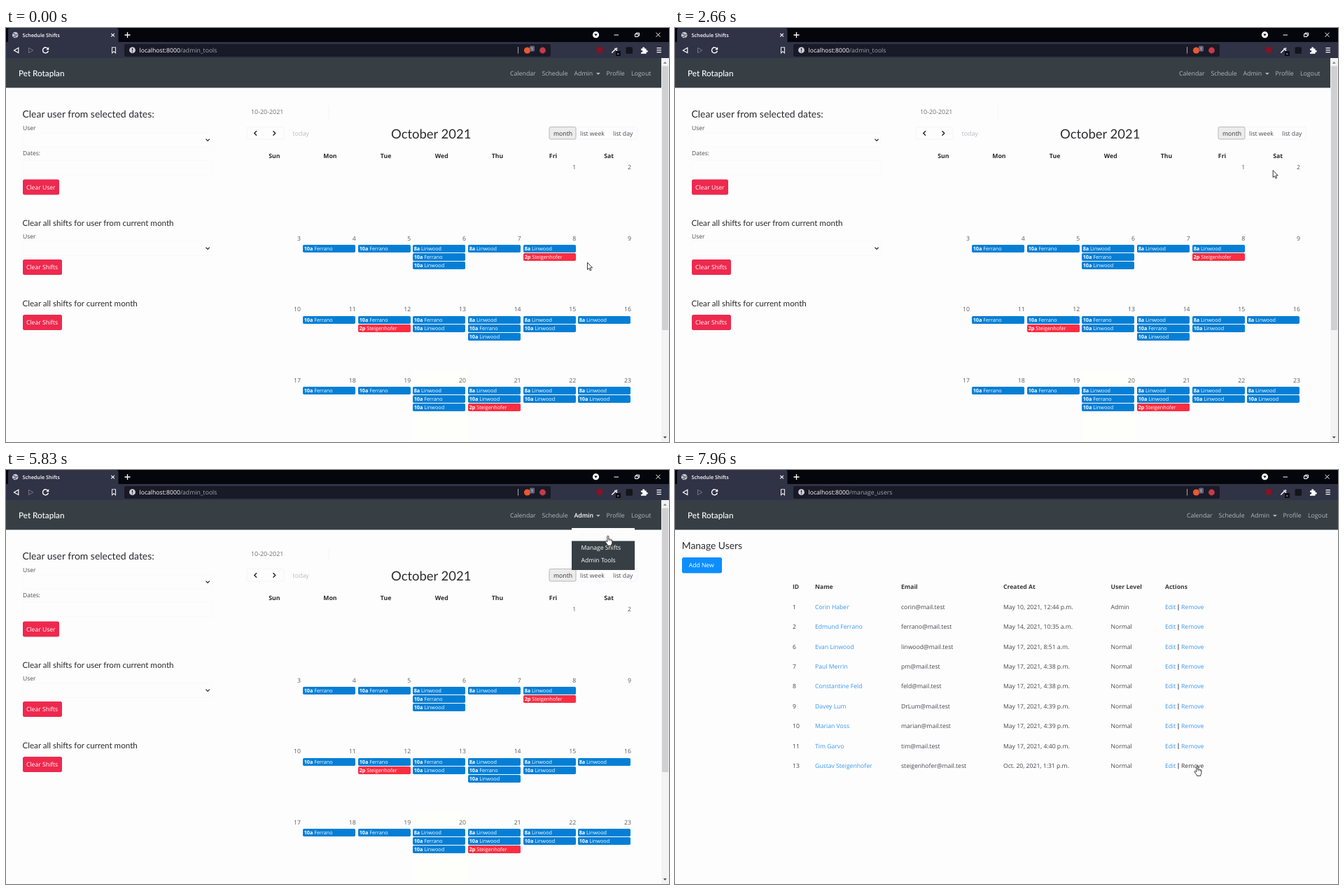
An HTML page for the animation above (8000 ms loop, 947x592 px).

```html
<!DOCTYPE html>
<html lang="en">
<head>
<meta charset="utf-8">
<title>Schedule Shifts</title>
<style>
html, body { margin: 0; width: 100%; height: 100%; overflow: hidden; background: #fdfdfe; }
svg { display: block; width: 947px; height: 592px; }
text { font-family: "Open Sans", "Noto Sans", sans-serif; white-space: pre; text-rendering: geometricPrecision; }
text.lato { font-family: Lato, sans-serif; }
</style>
</head>
<body>
<svg id="stage" viewBox="0 0 947 592"></svg>
<script>
const LOOP = 8000;
const stage = document.getElementById('stage');

function el(parent, tag, attrs = {}) {
  const node = document.createElementNS('http://www.w3.org/2000/svg', tag);
  for (const key in attrs) node.setAttribute(key, attrs[key]);
  parent.appendChild(node);
  return node;
}
const group = (parent) => el(parent, 'g');
const rect = (p, x, y, width, height, fill, rx = 0, more = {}) =>
  el(p, 'rect', { x, y, width, height, fill, rx, ...more });
const circle = (p, cx, cy, r, fill, more = {}) => el(p, 'circle', { cx, cy, r, fill, ...more });
const line = (p, d, stroke, width = 1, more = {}) =>
  el(p, 'path', { d, stroke, 'stroke-width': width, fill: 'none', ...more });
const shape = (p, d, fill, more = {}) => el(p, 'path', { d, fill, ...more });

// y is the middle of the capitals
function text(p, x, y, str, size = 8.7, fill = '#3a3a3c', more = {}) {
  const node = el(p, 'text', { x, y: y + size * 0.357, 'font-size': size, fill, ...more });
  node.textContent = str;
  return node;
}
const bold = { 'font-weight': 700 };
const semi = { 'font-weight': 600 };
const medium = { 'font-weight': 500 };
const lato = { class: 'lato' };
const show = (node, on) => node.setAttribute('visibility', on ? 'visible' : 'hidden');

// Browser frame
const chrome = group(stage);
rect(chrome, 0, 0, 947, 43, '#05060c');
rect(chrome, 0, 20, 947, 23.5, '#303245');
shape(chrome, 'M3 20V3Q3 0 6 0H157Q160.500 0 160.500 3V20Z', '#303245');
rect(chrome, 169, 23, 609, 18, '#191a27', 2);

const globe = group(chrome);
circle(globe, 13.2, 10, 4.3, '#c9cad0');
line(globe, 'M9.500 8.500Q12 7.500 13 9.500T16.500 9M10.500 12.500Q13 11 14.500 13.500', '#505266', 1.2);
const spinner = line(chrome, 'M13.500 5.700A4.300 4.300 0 0 1 13.500 14.300', '#d4552f', 1.3);

const tabTitle = text(chrome, 23.5, 10, '', 7.25, '#fff', semi);
line(chrome, 'M150.300 7.800l4.600 4.600m0-4.600l-4.600 4.600', '#fff', 1.1);
line(chrome, 'M169.500 10h8m-4-4v8', '#fff', 1.3);
circle(chrome, 842.5, 9.7, 4.6, '#fff');
shape(chrome, 'M840.200 8.500h4.600l-2.300 3Z', '#05060c');
line(chrome, 'M868.500 10h6.500M898.500 8.500h4.500v4h-4.500ZM900 8.500v-1.500h4.500v4h-1.500M928.500 6.700l6 6m0-6l-6 6', '#fff', 1);

line(chrome, 'M17.800 28.300v7.200L11.500 31.900Z', '#fff', 1.2);
line(chrome, 'M32.500 28.300v7.200l6.300-3.600Z', '#737587', 1);
const reload = group(chrome);
line(reload, 'M60 29.800A4 4 0 1 0 60.400 32.800', '#fff', 1.4);
shape(reload, 'M61.200 27.200v4h-4Z', '#fff');
const stop = line(chrome, 'M52.800 27.800l7.400 7.400m0-7.400l-7.400 7.400', '#fff', 1.3);
line(chrome, 'M151.500 27.800h5v8l-2.500-2.200-2.500 2.200Z', '#e8e8ee', 1.1);
circle(chrome, 180.5, 31.7, 4.4, '#cfd0d6');
line(chrome, 'M180.500 29v3.500m0 1v1.200', '#191a27', 1.2);

const url = el(chrome, 'text', { x: 190.5, y: 34.8, 'font-size': 8.66, fill: '#a3a4ae' });
el(url, 'tspan', { fill: '#fff', ...medium }).textContent = 'localhost:8000';
const urlPath = el(url, 'tspan');

line(chrome, 'M731.500 27v9.500', '#a5a6ae');
circle(chrome, 744.5, 32, 4.6, '#f0562f');
rect(chrome, 748, 25.5, 7, 8, '#62657a', 1.5);
text(chrome, 751.5, 29.5, '1', 6, '#fff', { 'text-anchor': 'middle' });
circle(chrome, 766.5, 32, 4.4, '#c83a48');
circle(chrome, 848, 31.3, 4.6, '#8c1220');
line(chrome, 'M865.300 35.500l5-5', '#fff', 1.4);
line(chrome, 'M869.500 29l3.500 3.500m-2-2l2-2', '#dcdce2', 1.8);
rect(chrome, 871, 33, 7, 7, '#0c0c12');
line(chrome, 'M873 37h2.500', '#ddd', 0.9);
rect(chrome, 885.5, 27.3, 9.5, 9.5, '#14141b', 1.5);
shape(chrome, 'M907 29.500h2.200a1.600 1.600 0 1 1 2.900 0H914.500v2.300a1.600 1.600 0 1 1 0 2.900V36.800H907v-2.100a1.600 1.600 0 1 0 0-2.900Z', '#fff');
line(chrome, 'M929.500 28.700h6.500m-6.500 3h6.500m-6.500 3h6.500', '#fff', 1.2);

// Navigation bar, shared by both pages
const NAV = '#373f44';
const NAV_TEXT = '#b3b7b9';
function navbar(page, shift) {
  rect(page, 0, 43, 947, 42.5, NAV);
  text(page, 18, 65.3, 'Pet Rotaplan', 11.7, '#fff', { ...lato, ...medium });
  const items = [[720, 'Calendar'], [765.5, 'Schedule'], [811.5, 'Admin'], [857.5, 'Profile'], [893, 'Logout']];
  const nodes = items.map(([x, str]) => text(page, x + shift, 65.3, str, 8.75, NAV_TEXT));
  shape(page, `M${843 + shift} 64h5.800l-2.900 3Z`, NAV_TEXT);
  return nodes;
}

function button(page, x, y, w, h, str, fill, pad = 5) {
  rect(page, x, y, w, h, fill, 2.5);
  text(page, x + pad, y + h / 2, str, 8.6, '#fff', medium);
}

// Admin tools page
const tools = group(stage);
rect(tools, 0, 43, 947, 549, '#fdfdfe');
const adminItem = navbar(tools, 0)[2];
const RED = '#ee294e';
const FAINT = { stroke: '#f9f9fc', 'stroke-width': 1 };

function select(y) {
  rect(tools, 24, y, 270, 20.5, '#fdfdfe', 2, FAINT);
  line(tools, `M285.500 ${y + 8.8}l2.600 2.600 2.600-2.600`, '#333', 1.3);
}
text(tools, 23.5, 123, 'Clear user from selected dates:', 13.95, '#2b2b2d', lato);
text(tools, 24, 142.5, 'User', 8.5, '#4a4a4d');
select(150);
text(tools, 24, 179, 'Dates:', 8.5, '#4a4a4d');
rect(tools, 24, 189.5, 270, 20.5, '#fdfdfe', 2, FAINT);
button(tools, 24, 216.5, 52, 22, 'Clear User', RED);
text(tools, 23.5, 279.3, 'Clear all shifts for user from current month', 11.62, '#2b2b2d', lato);
text(tools, 24, 298, 'User', 8.5, '#4a4a4d');
select(305);
button(tools, 24, 331, 56, 22, 'Clear Shifts', RED);
text(tools, 23.5, 394, 'Clear all shifts for current month', 11.62, '#2b2b2d', lato);
button(tools, 24, 410, 56, 22, 'Clear Shifts', RED);

text(tools, 350, 120, '10-20-2021', 8.9, '#6d6d70');
line(tools, 'M461.500 111v19', '#f5f5f9');
rect(tools, 344, 141.5, 53, 17.5, '#fdfdfe', 2, { stroke: '#f4f4f9' });
line(tools, 'M358 147.300l-3.200 3.200 3.200 3.200M381.500 147.300l3.200 3.200-3.200 3.200', '#222', 1.4);
text(tools, 409.5, 150.5, 'today', 8.9, '#bcbcbf');
text(tools, 550, 151.8, 'October 2021', 18.45, '#2b2b2d', lato);
rect(tools, 776, 141.5, 125, 17.5, '#fdfdfe', 2, { stroke: '#f4f4f9' });
rect(tools, 776, 141.5, 38, 17.5, '#ececec', 2, { stroke: '#b9b9bb' });
text(tools, 782, 150.5, 'month', 8.7, '#333');
text(tools, 820, 150.5, 'list week', 8.7, '#4a4a4d');
text(tools, 867, 150.5, 'list day', 8.7, '#4a4a4d');

// Calendar grid
const PITCH = 78.65, ROW = 101.75;
const KINDS = {
  b: ['10a', 'Ferrano', '#047fd5'],
  s: ['8a', 'Linwood', '#047fd5'],
  S: ['10a', 'Linwood', '#047fd5'],
  f: ['2p', 'Steigenhofer', '#fb2d42']
};
const WEEKS = [
  ['', '', '', '', '', '', ''],
  ['', 'b', 'b', 'sbS', 's', 'sf', ''],
  ['', 'b', 'bf', 'bS', 'sbS', 'sS', 's'],
  ['', 'b', 'b', 'sbS', 'sSf', 'sS', 'sS']
];
['Sun', 'Mon', 'Tue', 'Wed', 'Thu', 'Fri', 'Sat'].forEach((day, i) =>
  text(tools, 383.3 + i * 79.65, 183, day, 8.7, '#2b2b2d', { ...bold, 'text-anchor': 'middle' }));
rect(tools, 581, 491, 78, 101, '#fefefa');
// the number of a day sits at the right end of its cell
WEEKS.forEach((week, r) => week.forEach((codes, c) => {
  const day = r * 7 + c - 4;
  if (day > 0) {
    text(tools, 421 + c * PITCH, 198.7 + r * ROW, day, 8.7, '#5b5b5e', { 'text-anchor': 'end' });
  }
  [...codes].forEach((code, i) => {
    const [hour, name, fill] = KINDS[code];
    const x = Math.round(424 + (c - 1) * PITCH);
    const y = Math.round(208.1 + r * ROW) + i * 12;
    rect(tools, x, y, 75, 11, fill, 1.8);
    const label = text(tools, x + 1.7, y + 5.5, '', 7.25, '#fff');
    el(label, 'tspan', bold).textContent = hour;
    el(label, 'tspan', medium).textContent = ' ' + name;
  });
}));

rect(tools, 936, 43, 11, 549, '#f3f3f4');
rect(tools, 937, 54.5, 9, 377.5, '#d0d0d3');
shape(tools, 'M938.800 51h5l-2.500-3Z', '#8a8a8d');
shape(tools, 'M938.800 584h5l-2.500 3Z', '#55555a');

// Admin menu
const menu = group(tools);
rect(menu, 808, 84, 90, 59, NAV);
const menuItems = ['Manage Vets', 'Manage Shifts', 'Admin Tools'].map((str, i) => {
  const top = 83 + i * 18.5;
  return {
    top,
    back: rect(menu, 808, top, 90, 18.5, '#fdfdfe'),
    label: text(menu, 821.5, 92.2 + i * 18.5, str, 8.6, '#fff', medium)
  };
});

// User list page
const users = group(stage);
rect(users, 0, 43, 947, 549, '#fdfdfe');
navbar(users, 11);
text(users, 9.8, 108.3, 'Manage Users', 13.85, '#2b2b2d', lato);
button(users, 10, 125, 57, 22.5, 'Add New', '#0d8eff', 9.7);
const COLS = [168, 200, 323, 469, 622.5, 700];
['ID', 'Name', 'Email', 'Created At', 'User Level', 'Actions'].forEach((str, i) =>
  text(users, COLS[i], 167, str, 8.6, '#3a3a3c', bold));

const LINK = '#3a97ee';
const PEOPLE = [
  [1, 'Corin Haber', 'corin', 'May 10, 2021, 12:44 p.m.'],
  [2, 'Edmund Ferrano', 'ferrano', 'May 14, 2021, 10:35 a.m.'],
  [6, 'Evan Linwood', 'linwood', 'May 17, 2021, 8:51 a.m.'],
  [7, 'Paul Merrin', 'pm', 'May 17, 2021, 4:38 p.m.'],
  [8, 'Constantine Feld', 'feld', 'May 17, 2021, 4:38 p.m.'],
  [9, 'Davey Lum', 'DrLum', 'May 17, 2021, 4:39 p.m.'],
  [10, 'Marian Voss', 'marian', 'May 17, 2021, 4:39 p.m.'],
  [11, 'Tim Garvo', 'tim', 'May 17, 2021, 4:40 p.m.'],
  [13, 'Gustav Steigenhofer', 'steigenhofer', 'Oct. 20, 2021, 1:31 p.m.']
];
const removeLinks = PEOPLE.map(([id, name, mail, made], i) => {
  const y = 196 + i * 28.35;
  const cells = [id, name, mail + '@mail.test', made, i ? 'Normal' : 'Admin', 'Edit'];
  cells.forEach((str, c) => text(users, COLS[c], y, str, 8.65, c === 1 || c === 5 ? LINK : '#454548'));
  line(users, `M719 ${y - 3.8}v8.500`, '#333', 0.9);
  return { y, node: text(users, 723, y, 'Remove', 8.65, LINK) };
});

// Pointers, with the hot spot at 0,0
const ink = { stroke: '#222', 'stroke-width': 0.9, 'stroke-linejoin': 'round' };
const arrow = shape(stage, 'M0.400 0.400V10.600L2.700 8.500 4.200 12 5.800 11.300 4.300 7.900H7.500Z', '#fff', ink);
const hand = group(stage);
shape(hand, 'M-1.200 8.800V1.200Q-1.200 0.200 -0.200 0.200T0.900 1.200V5Q2 4.200 2.700 5.300 3.800 4.700 4.400 5.700 5.800 5.400 5.900 6.900V10Q5.800 11.800 4.700 13V14.300H-0.600V13.200Q-2.200 11.500 -3.900 8.700 -4 7.300 -2.700 7.600Z', '#fff', ink);
line(hand, 'M0.900 5v2.300M2.700 5.500v2M4.400 5.900v1.800', '#222', 0.6);

// Pointer path: time, x, y
const PATH = [
  [0, 830, 335], [830, 876, 296], [1660, 917, 254], [1900, 917, 254],
  [2160, 902, 240], [2330, 902, 240], [3030, 800, 162], [3160, 798, 160],
  [3500, 757, 126], [3960, 772, 104], [4800, 836, 66], [5000, 837, 65],
  [5430, 846, 78], [5630, 846, 78], [5830, 860, 94], [6000, 855, 94],
  [6460, 855, 94], [7000, 836, 230], [7700, 750, 420], [7900, 746, 423], [8000, 746, 423]
];
function pointer(t) {
  let i = 1;
  while (t > PATH[i][0]) i++;
  const [t0, x0, y0] = PATH[i - 1], [t1, x1, y1] = PATH[i];
  const k = (t - t0) / (t1 - t0);
  return [x0 + (x1 - x0) * k, y0 + (y1 - y0) * k];
}

const OPEN = 4860, CLICK = 5960, SWAP = 6100, LOADED = 6480;

function draw(now) {
  const t = now % LOOP;
  const [x, y] = pointer(t);
  const onUsers = t >= SWAP, loading = t >= CLICK && t < LOADED;
  const open = t >= OPEN && !onUsers;

  show(tools, !onUsers);
  show(users, onUsers);
  menu.style.display = open ? '' : 'none';
  show(globe, !loading);
  show(spinner, loading);
  spinner.setAttribute('transform', `rotate(${(t - 6260) * 0.36} 13.200 10)`);
  show(reload, !loading);
  show(stop, loading);
  tabTitle.textContent = loading && onUsers ? 'localhost:8000/manage_users' : 'Schedule Shifts';
  urlPath.textContent = onUsers ? '/manage_users' : '/admin_tools';

  const onAdmin = !onUsers && x > 811 && x < 850 && y > 58 && y < 83;
  adminItem.setAttribute('fill', open || onAdmin ? '#fff' : NAV_TEXT);
  adminItem.setAttribute('font-weight', open || onAdmin ? 600 : 400);

  let onLink = onAdmin;
  for (const { top, back, label } of menuItems) {
    const over = open && y >= top && y < top + 18.5;
    back.style.display = over ? '' : 'none';
    label.setAttribute('fill', over ? '#f8f8fa' : '#fff');
    onLink = onLink || over;
  }
  for (const link of removeLinks) {
    const over = onUsers && x > 722 && x < 757 && Math.abs(y - link.y) < 6;
    link.node.setAttribute('fill', over ? '#333335' : LINK);
    onLink = onLink || over;
  }

  show(hand, onLink);
  show(arrow, !onLink);
  (onLink ? hand : arrow).setAttribute('transform', `translate(${x} ${y})`);
  requestAnimationFrame(draw);
}
draw(performance.now());
</script>
</body>
</html>
```
